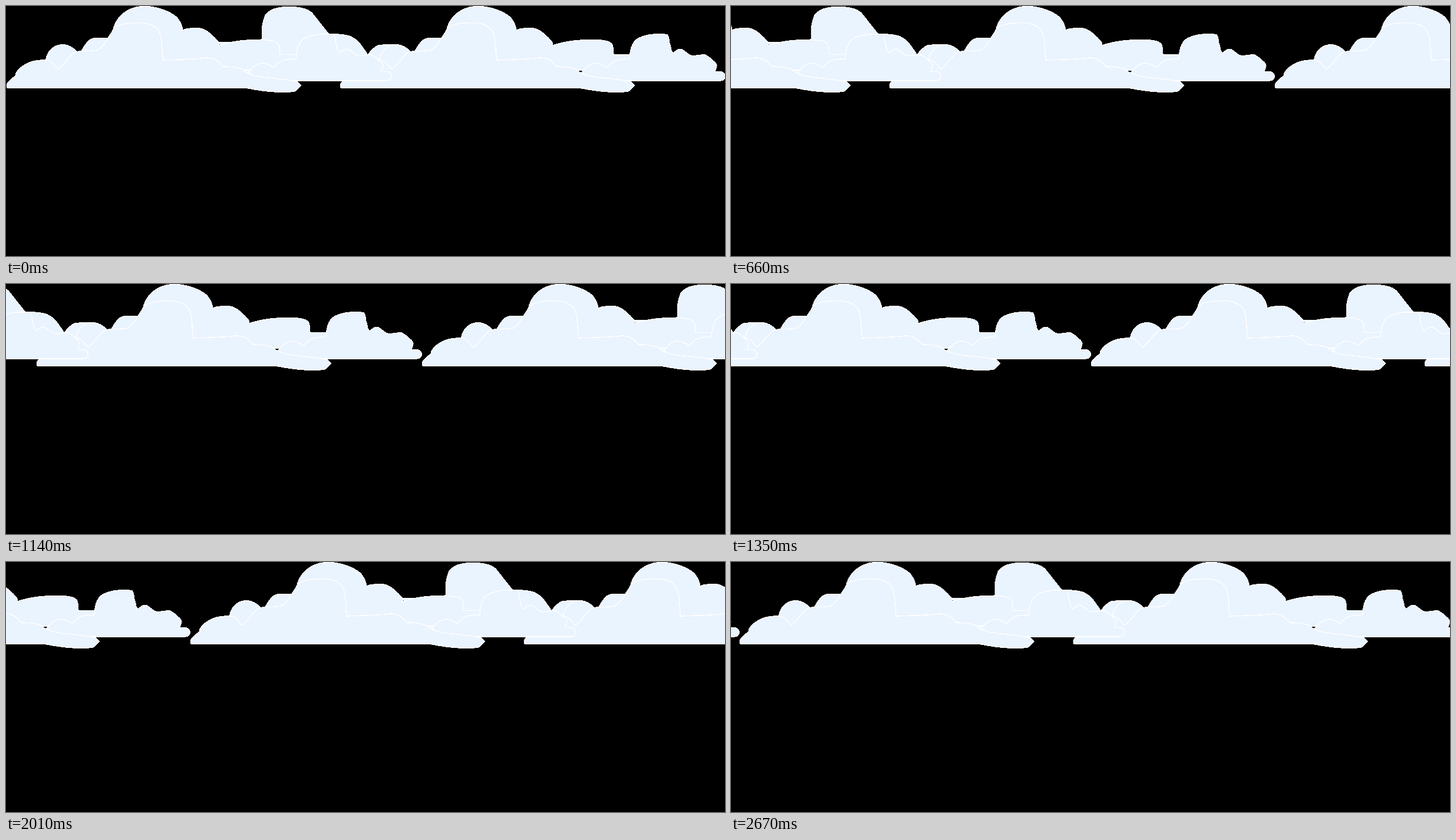
These frames come from a looping animation (1220x425 px, 2.7 s). An HTML page:

```html
<!DOCTYPE html>
<html lang="en">
<head>
<meta charset="utf-8">
<title>Drifting clouds</title>
<style>
  html, body { margin: 0; width: 100%; height: 100%; overflow: hidden; background: #000; }
  svg { display: block; width: 1220px; height: 425px; }
  path { fill: #eaf4ff; stroke: #fff; stroke-width: 1.4; stroke-linejoin: round; shape-rendering: crispEdges; }
  #sky { animation: drift 2.7s steps(90) infinite; }
  @keyframes drift { to { transform: translateX(-1220px); } }
</style>
</head>
<body>
<svg viewBox="0 0 1220 425">
  <defs>
    <g id="bank">
      <!-- rear bumps and dome -->
      <path d="M67.500 95C68 80 78 66 97 65.500C108 66 114 72 121 78V110H67.500Z"/>
      <path d="M126 79C133 70 138 55 152 54.500H175V90H126Z"/>
      <path d="M181 45C185 18 207 .5 236 .5C263 1.500 285 13 292 22C297 29 299 36 300 41C306 38 320 37 333 38.500C345 44 354 53 361 62L362 67C376 62 396 58 424 57.500C444 57 460 59 463 66C465 72 464 78 465 82.500H500V109H181Z"/>
      <!-- right-hand cloud -->
      <path d="M411 113C417 105 424 98 434 97C444 97 450 102 454 105C460 98 467 91 478 91C484 89 488 91 492 90C493 68 500 57 510 53.500C522 48 540 47 556 48.500C561 56 558 60 560 64C563 70 561 76 566 80C570 77 574 72 580 73.500C586 76 590 82 596 84C604 86 612 82 620 83C628 86 633 92 639 98C642 103 638 106 637 111.500C643 111 650 111 653 115C656 120 654 127 645 127H480L420 119Z"/>
      <!-- front cloud with its tail -->
      <path d="M2 139C0 134 2 129 16 119C17 110 26 102 40 96C50 92 58 92 68 92C78 93 82 100 88 108C96 104 104 88 116 79C124 75 136 78 155 75C166 70 172 54 180 44C184 33 198 29 222 28.500C240 28 256 33 261 46C266 60 264 76 267 92C290 91 320 91 340 88C352 88 362 94 368 103C382 103 396 104 404 109.500C411 117 427 120.500 445 122C465 124 485 126 494 129L501 135L490 145C478 147 450 148 406 139Z"/>
    </g>
    <g id="tile">
      <path d="M610 86C618 80 622 70 632 67C645 65 655 65 668 67V100H610Z"/>
      <use href="#bank" x="566"/>
      <path d="M361 61.500C368 61 372 62 378 62L434.500 57C434 40 434 30 440 16C448 4 465 1.500 480 1.500C500 1.500 515 6 521 14C530 25 540 39 549 49V120H400Z"/>
      <path d="M540 48.500C556 47 575 48 585 52C598 58 605 70 613 82V95H540Z"/>
      <use href="#bank"/>
    </g>
  </defs>
  <g id="sky">
    <use href="#tile"/>
    <use href="#tile" x="1220"/>
  </g>
</svg>
</body>
</html>
```
